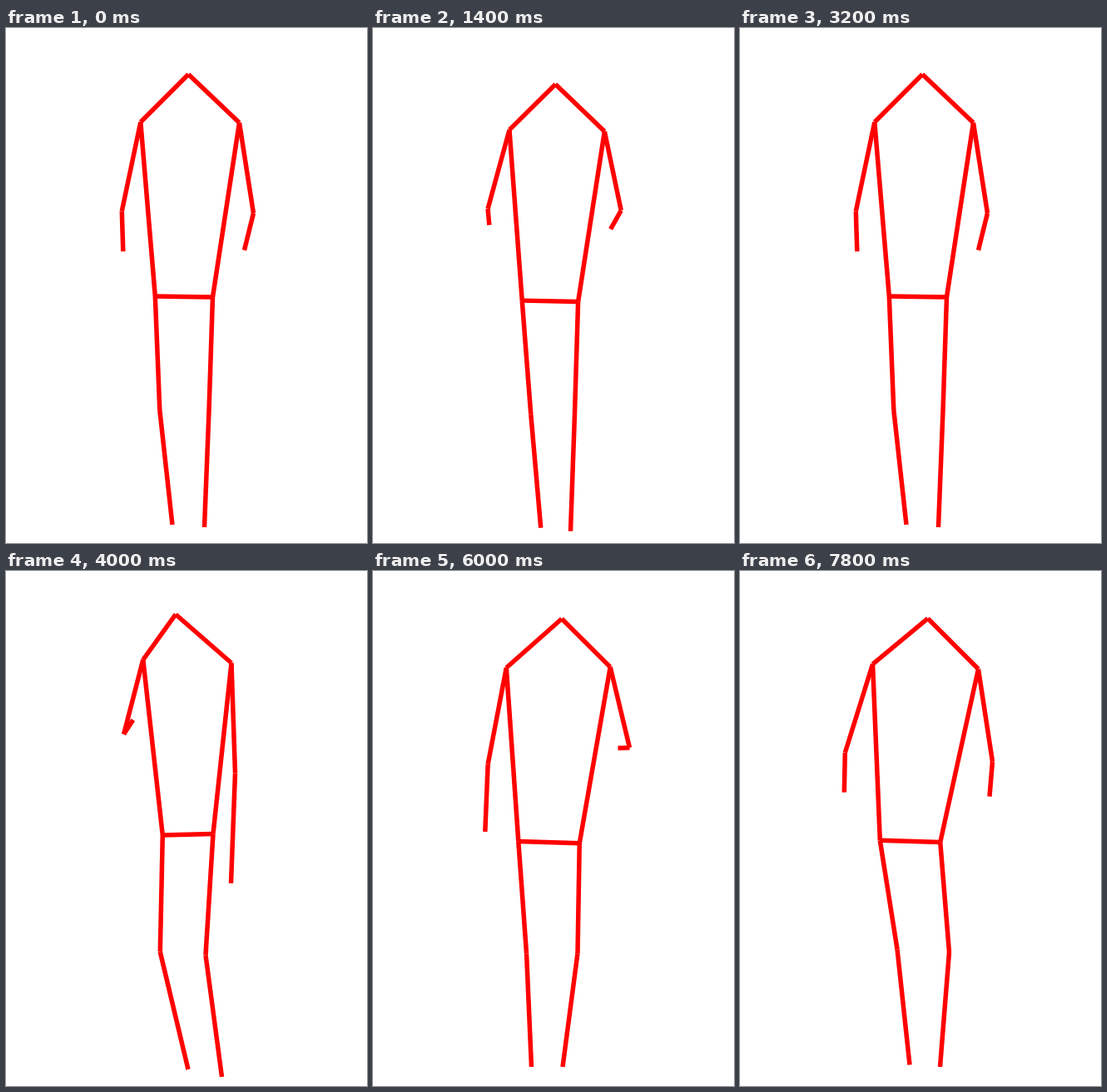
An HTML page with a canvas for the animation above (8000 ms loop, 434x620 px).

```html
<!DOCTYPE html>
<html lang="en">
<head>
<meta charset="utf-8">
<title>Stick figure</title>
<style>
  html, body { margin: 0; width: 100%; height: 100%; overflow: hidden; background: #fff; }
  canvas { display: block; }
</style>
</head>
<body>
<canvas id="stage" width="434" height="620"></canvas>
<script>
const STEP = 200, SWING = 1600, LOOP = 5 * SWING;

// A joint has a resting place and leans along one vector per mode of movement.
const joint = (rest, lift, reach, sway) => ({ rest, modes: [lift, reach, sway] });

const head = joint([219.3, 55.7], [-0.3, -48.2], [15.3, 3.5], [-26, -5.5]);

const left = {
  shoulder: joint([161.8, 113.3], [-8.7, -37.2], [-3, 6.5], [9, 5]),
  elbow: joint([139.3, 220.5], [5, 11], [-2.3, 24], [52, 7]),
  hand: joint([140.8, 269], [4, 127], [-12, 89.7], [62, 10]),
  hip: joint([179.3, 323], [0.3, -20.5], [-9, 5], [44, -5]),
  knee: joint([184.8, 460], [-20, -21], [-0.5, 1.5], [-17, 18]),
  foot: joint([200, 598], [-7, -15], [-19, -2], [-16, 14])
};

const right = {
  shoulder: joint([280.5, 114], [8.5, -42], [9.5, 3.3], [-24, -16]),
  elbow: joint([297.5, 223], [-3, 13.5], [22, -20.5], [-24, -25]),
  hand: joint([286.5, 267.5], [3.5, 101.5], [16, -108.5], [-54, -16]),
  hip: joint([248.5, 324], [7.5, -22], [-0.5, 7.5], [31, -10]),
  knee: joint([244, 461], [6.5, -28], [4, -1.5], [-30, 8]),
  foot: joint([238.5, 601], [4, -19], [-21, -8], [-8, 16])
};

const sideBones = ({ shoulder, elbow, hand, hip, knee, foot }) => [
  [head, shoulder], [shoulder, elbow], [elbow, hand],
  [shoulder, hip], [hip, knee], [knee, foot]
];
const bones = [...sideBones(left), ...sideBones(right), [left.hip, right.hip]];

const ctx = document.getElementById("stage").getContext("2d");
ctx.strokeStyle = "#f00";
ctx.lineWidth = 5.5;

// Every mode swings backward, then forward, in straight ramps out and back.
function swingAt(time) {
  const t = Math.floor((time % LOOP) / STEP) * STEP;
  const swing = Math.floor(t / SWING);
  const ramp = 1 - Math.abs(2 * (t % SWING) / SWING - 1);
  return { mode: Math.floor(swing / 2), amount: swing % 2 ? ramp : -ramp };
}

function draw(time) {
  const { mode, amount } = swingAt(time);
  const place = ({ rest, modes }) => rest.map((v, i) => v + modes[mode][i] * amount);
  ctx.clearRect(0, 0, 434, 620);
  for (const [from, to] of bones) {
    ctx.beginPath();
    ctx.moveTo(...place(from));
    ctx.lineTo(...place(to));
    ctx.stroke();
  }
}

let start;
function tick(now) {
  start ??= now;
  draw(now - start);
  requestAnimationFrame(tick);
}
draw(0);
requestAnimationFrame(tick);
</script>
</body>
</html>
```
